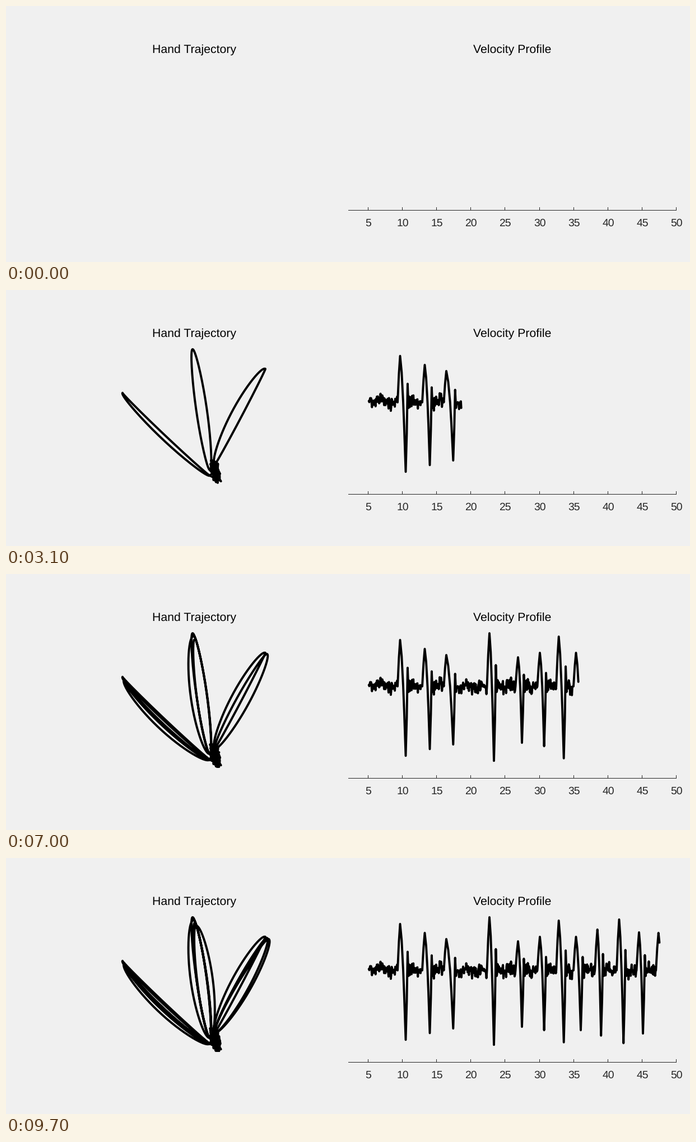
A matplotlib script for the animation above (9800 ms loop, 1221 px wide and 458 px high).

```python
import numpy as np
import matplotlib.pyplot as plt
from matplotlib.animation import FuncAnimation

WIDTH, HEIGHT, DPI = 1221, 458, 64
FRAMES, INTERVAL = 98, 100
PT = 72 / DPI
ORIGIN, SPEED = 646.5, 5.36   # sweep start and pixels per frame
BASE = 201                    # height of zero velocity
REST = np.array([374.5, 325.0])

# Targets visited in turn: base, first tip, tip drift per visit,
# and the sideways (out, back) bow of each visit.
TARGETS = [
    ((364, 332), (208, 184), (3, 4), [(-3, -11), (-21, -14), (-5, -4), (-10, -14)]),
    ((364, 322), (333, 106), (2, 5), [(-9, 10), (9, -20), (-10, 8), (-10, 18)]),
    ((373, 312), (463, 141), (3, 2), [(-17, 2), (-9, 14), (-10, 16), (-10, 10)]),
]
# Sweep position of each peak, gap to the following trough, peak height.
PULSES = [(703.5, 10, 83), (747.5, 9, 67), (786, 12.3, 56), (863, 8, 95),
          (914, 7, 52), (953, 7.6, 60), (986.7, 9, 89), (1017.5, 8.5, 60),
          (1055.7, 6.5, 73), (1094.5, 7.8, 91), (1130, 7, 68), (1164.7, 8.3, 67)]

rng = np.random.default_rng(7)


def pulse(peak, gap, up):
    """Speed-up, braking and rebound of one reach as (sweep, y) points."""
    trough, down = peak + gap, 62 + 0.75 * up
    t = [peak - 4.5, peak - 2.2, peak, peak + 0.28 * gap, peak + 0.55 * gap,
         peak + 0.72 * gap, trough, trough + 1.9, trough + 3.4, trough + 5]
    v = [0, 0.6 * up, up, 0.65 * up, 0, -0.34 * down, -down, -0.45 * down,
         0.4 * up, -10]
    return np.column_stack([t, BASE - np.array(v)])


def travel(start, end, bow, begin, finish):
    """Bowed path between two points with smooth acceleration and braking."""
    start, end = np.array(start, float), np.array(end, float)
    u = np.linspace(0, 1, 60)
    s = (u * u * (3 - 2 * u))[:, None]
    dx, dy = (end - start) / np.hypot(*(end - start))
    side = bow * np.sqrt(np.abs(np.sin(np.pi * s))) * [-dy, dx]
    return np.column_stack([begin + u * (finish - begin),
                            start + s * (end - start) + side])


def tremor(begin, finish):
    """Small hand movements around the resting place."""
    t = np.arange(begin + 1, finish - 0.5, 1.1)
    dy = np.clip(rng.normal(0, 10, len(t)), -20, 20)
    dx = np.clip(rng.normal(0, 4, len(t)), -7, 7) + 0.17 * dy
    return np.column_stack([t, REST + np.column_stack([dx, dy])])


def jitter(begin, finish):
    """Velocity noise between two pulses."""
    t = np.arange(begin + 0.7, finish - 0.5, 0.8)
    noise = np.clip(rng.normal(0, 6.5, len(t)), -14, 14)
    return np.column_stack([t, BASE + 2.5 * np.sin(t / 4) + noise])


vel, hand = [], []
vel_time = hand_time = 647
for k, (peak, gap, up) in enumerate(PULSES):
    visit, which = divmod(k, len(TARGETS))
    base, tip, drift, bows = TARGETS[which]
    tip = np.add(tip, np.multiply(drift, visit))
    out, back = bows[visit]
    beat = pulse(peak, gap, up)
    start, turn, done = beat[[0, 4, 8], 0]
    vel += [jitter(vel_time, start), beat]
    hand += [tremor(hand_time, start),
             travel(base, tip, out, start, turn),
             travel(tip, base, -back, turn, done)]
    vel_time, hand_time = beat[-1, 0], done
vel, hand = np.vstack(vel), np.vstack(hand)


def until(data, limit):
    """Rows up to the sweep limit, closed by an interpolated end point."""
    head = data[data[:, 0] < limit]
    if len(head) in (0, len(data)):
        return head
    end = [np.interp(limit, data[:, 0], col) for col in data.T]
    return np.vstack([head, end])


plt.rcParams["text.hinting"] = "none"
fig = plt.figure(figsize=(WIDTH / DPI, HEIGHT / DPI), dpi=DPI, facecolor="#f0f0f0")
ax = fig.add_axes([0, 0, 1, 1])
ax.set(xlim=(0, WIDTH), ylim=(HEIGHT, 0))
ax.axis("off")


def label(x, y, text, size, color):
    ax.text(x, y, text, fontsize=size * PT, color=color, ha="center",
            va="baseline", family="Liberation Sans")


label(336.3, 84, "Hand Trajectory", 21.3, "black")
label(903.7, 84, "Velocity Profile", 21.3, "black")
axis_style = dict(color="#262626", lw=PT, solid_capstyle="butt", snap=False)
ax.plot([611, 1197], [365.5, 365.5], **axis_style)
for k in range(10):
    tick = round(646 + 61.1 * k) + 0.5
    ax.plot([tick, tick], [360, 366], **axis_style)
    label(tick + 0.5, 394, str(5 * (k + 1)), 19.4, "#262626")

pen = dict(color="black", lw=3.9 * PT, solid_capstyle="round", solid_joinstyle="round")
hand_line, = ax.plot([], [], **pen)
vel_line, = ax.plot([], [], **pen)


def draw(n):
    limit = ORIGIN + SPEED * n
    hand_line.set_data(*until(hand, limit)[:, 1:].T)
    vel_line.set_data(*until(vel, limit).T)
    return hand_line, vel_line


anim = FuncAnimation(fig, draw, frames=FRAMES, interval=INTERVAL,
                     init_func=lambda: draw(0), repeat=True, repeat_delay=0)
plt.show()
```
